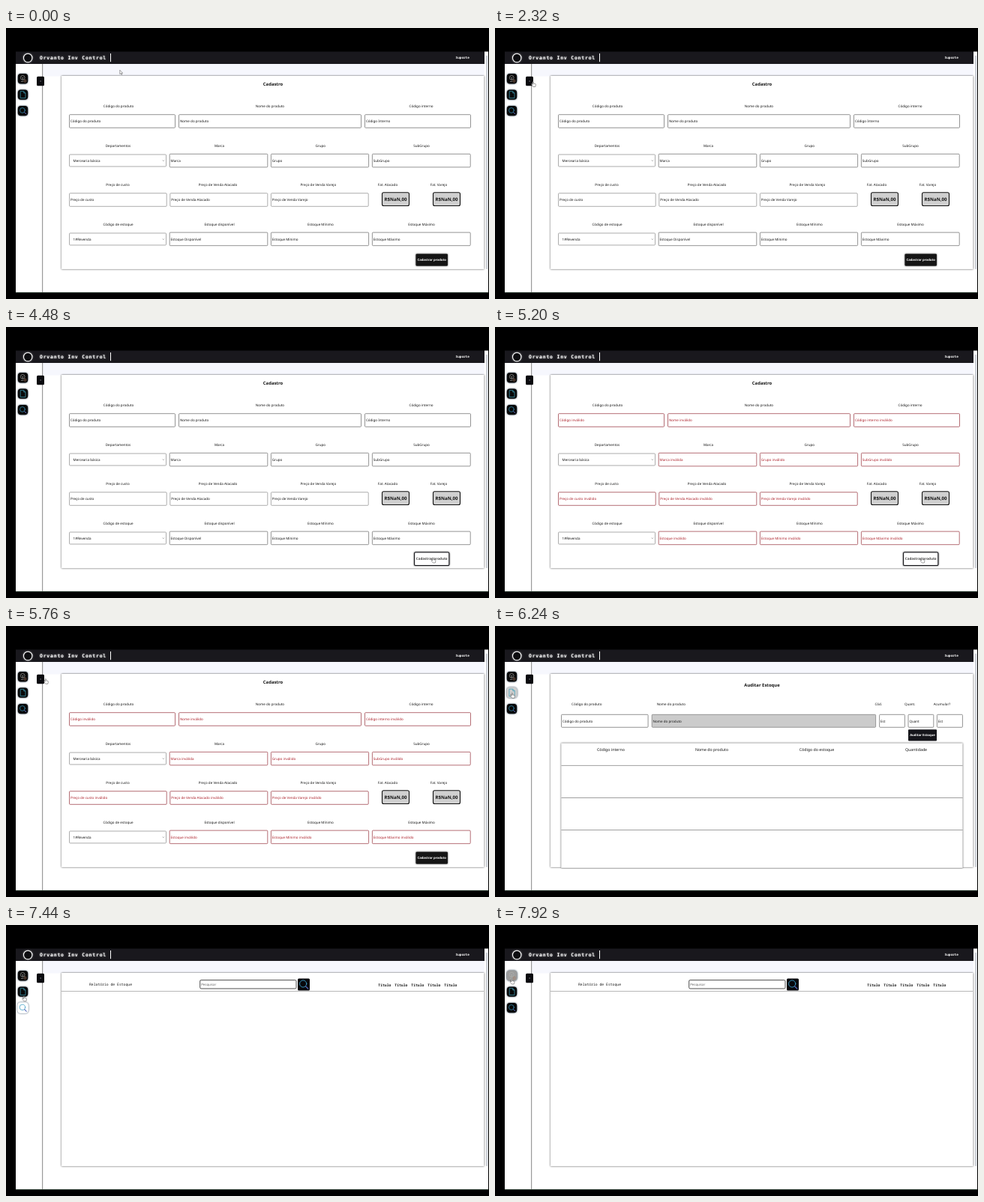
Recreate the animation shown at these times as an HTML page. Size 644 px wide and 362 px high, loop 8000 ms.

```html
<!DOCTYPE html>
<html lang="pt-BR">
<head>
<meta charset="utf-8">
<title>Cadastro</title>
<style>
  html, body { margin: 0; height: 100%; overflow: hidden; background: #000; }
  svg { display: block; width: 100vw; height: 100vh; }
  text { font: 4.55px "Noto Sans", sans-serif; fill: #141414; text-rendering: geometricPrecision; }
  .mid { text-anchor: middle; }
  .title { font-size: 5.9px; font-weight: 600; }
  .head { font-size: 5.25px; }
  .price { font-size: 6.1px; font-weight: 600; }
  .action { font-size: 4.2px; font-weight: 700; fill: #fff; }
  .mono { font: 4.75px "Noto Sans Mono", monospace; }
  .strong { font-weight: 600; }
  .brand { font: 700 6.4px "DejaVu Sans Mono", monospace; letter-spacing: .84px; fill: #fff; }
  .glow { filter: drop-shadow(0 0 1px #fff9); }
  .invalid { fill: #ac1f29; }
  .raised { filter: drop-shadow(0 0 1px #000b); }
</style>
</head>
<body>
<svg id="stage" viewBox="0 0 644 362" preserveAspectRatio="none"></svg>
<script>
const LOOP = 8000, STEP = 80, FADE = 400;
const RED = '#96303a', DARK = '#15151a';

const text = (x, y, label, cls = '') => `<text x="${x}" y="${y}" class="${cls}">${label}</text>`;
const mid = (x, y, label, cls = '') => text(x, y, label, 'mid ' + cls);
const rect = (x, y, w, h, fill, extra = '') =>
  `<rect x="${x}" y="${y}" width="${w}" height="${h}" fill="${fill}" ${extra}/>`;
const line = (x1, y1, x2, y2, color, width = .7) =>
  `<path d="M${x1} ${y1}L${x2} ${y2}" stroke="${color}" stroke-width="${width}"/>`;

const field = (x, y, w, label, { h = 17.6, stroke = '#666', fill = '#fff', cls = '' } = {}) =>
  rect(x, y, w, h, fill, `rx="1" stroke="${stroke}" stroke-width=".7"`) +
  text(x + 1.4, y + h / 2 + 1.7, label, cls);

const select = (y, label) =>
  rect(84.5, y, 129, 16, '#fff', 'rx="1" stroke="#999" stroke-width=".8"') +
  text(89.6, y + 9.7, label) +
  `<path d="M208.9 ${y + 7.6}l1 1 1-1" fill="none" stroke="#333" stroke-width=".5"/>`;

const price = (x, label) =>
  mid(x - 10.5, 211.2, label) +
  rect(x - 18, 219.7, 36, 17.8, '#d0d0d0', 'rx="2" stroke="#111" stroke-width="1.1"') +
  mid(x, 230.9, 'R$NaN,00', 'price');

// label, label centre, field x, y, width, placeholder, message when invalid
const FORM_FIELDS = [
  ['Código do produto', 150, 84.5, 115.7, 141, 'Código do produto', 'Código inválido'],
  ['Nome do produto', 352, 230.5, 115.7, 243, 'Nome do produto', 'Nome inválido'],
  ['Código interno', 553.5, 478.5, 115.7, 141, 'Código Interno', 'Código interno inválido'],
  ['Marca', 284.5, 218.2, 168.3, 130.6, 'Marca', 'Marca inválida'],
  ['Grupo', 419.3, 353.4, 168.3, 130.2, 'Grupo', 'Grupo inválido'],
  ['SubGrupo', 554, 488.4, 168.3, 130.8, 'SubGrupo', 'SubGrupo inválido'],
  ['Preço de custo', 149, 84.5, 220.7, 129.7, 'Preço de custo', 'Preço de custo inválido'],
  ['Preço de Venda Atacado', 282.5, 218.8, 220.7, 130, 'Preço de Venda Atacado', 'Preço de Venda Atacado inválido'],
  ['Preço de Venda Varejo', 416.3, 353.4, 220.7, 129.8, 'Preço de Venda Varejo', 'Preço de Venda Varejo inválido'],
  ['Estoque disponível', 284.5, 218.2, 273.1, 130.6, 'Estoque Disponível', 'Estoque inválido'],
  ['Estoque Mínimo', 419.3, 353.4, 273.1, 130.2, 'Estoque Mínimo', 'Estoque Mínimo inválido'],
  ['Estoque Máximo', 554, 488.4, 273.1, 130.8, 'Estoque Máximo', 'Estoque Máximo inválido'],
];

const form = invalid =>
  mid(356, 77.2, 'Cadastro', 'title') +
  FORM_FIELDS.map(([label, cx, x, y, w, hint, error]) =>
    mid(cx, y - 9.6, label) +
    (invalid ? field(x, y, w, error, { stroke: RED, cls: 'invalid' })
             : field(x, y, w, hint, { stroke: y === 220.7 ? '#8c8c8c' : '#666' }))).join('') +
  mid(149.5, 158.7, 'Departamentos') + select(169, 'Mercearia básica') +
  mid(149.5, 263.5, 'Código de estoque') + select(274, '1#Revenda') +
  price(519.5, 'Fat. Atacado') + price(587.5, 'Fat. Varejo');

const magnifier = (x, y, s = 1) =>
  `<g transform="translate(${x} ${y}) scale(${s})" fill="none" stroke-linecap="round">
    <circle cx="-.6" cy="-.6" r="3.4" stroke="#3a9cc4" stroke-width=".7"/>
    <path d="M1.9 1.9L4.3 4.3" stroke="#5a6cc0" stroke-width="1"/></g>`;

const audit =
  mid(356, 81.2, 'Auditar Estoque', 'title') +
  [[122.3, 'Código do produto'], [234.8, 'Nome do produto'], [511.3, 'Cód.'],
   [553.2, 'Quant.'], [596, 'Acumular?']].map(([x, label]) => mid(x, 106.1, label)).join('') +
  field(88.5, 118.3, 115.6, 'Código do produto', { h: 17 }) +
  field(209.2, 118.3, 298.4, 'Nome do produto', { h: 17, fill: '#cbcbcb', stroke: '#777' }) +
  field(512.6, 118.3, 33.8, 'Est', { h: 17 }) +
  field(551, 118.3, 33.8, 'Quant', { h: 17 }) +
  field(589.4, 118.3, 34, 'Est', { h: 17 }) +
  rect(551, 138.2, 38, 15.4, DARK, 'rx="1"') + mid(570, 147.4, 'Auditar Estoque', 'action') +
  rect(88.3, 156.5, 535.2, 166.5, '#fff', 'class="raised"') +
  [[154.4, 'Código interno'], [289, 'Nome do produto'], [429, 'Código do estoque'],
   [561.5, 'Quantidade']].map(([x, label]) => mid(x, 167.4, label, 'head')).join('') +
  [186.4, 229.5, 272.5].map(y => line(88.5, y, 623.5, y, '#777')).join('');

const report =
  line(74, 88.5, 637, 88.5, '#999') +
  text(111, 80.8, 'Relatório de Estoque', 'mono') +
  rect(258.7, 73.6, 128.3, 11.4, '#fff', 'rx="1.5" stroke="#222" stroke-width=".8"') +
  `<text x="260.2" y="80.9" style="font-size:4.4px;fill:#666">Pesquisar</text>` +
  rect(389, 71.5, 16, 16, '#08080c', 'rx="1.5"') + magnifier(397, 79.3, 1.35) +
  [0, 1, 2, 3, 4].map(i => text(496.3 + 22 * i, 81.6, 'Título', 'mono strong')).join('');

const GLYPHS = [
  `<g fill="none" stroke="#b4b4b0" stroke-width=".6"><circle cx="-.3" cy="-1.3" r="2.9"/>
   <path d="M-1.6-2l1.3 1.4L1-2M-.3-.6V2M-2.5 3.8H.8"/><path d="M1.8 1.6h2.4v2.8H1.8z" stroke="#a87a62"/></g>`,
  `<path d="M-3.3-4.5H1.2L3.5-2.2V4.5H-3.3zM1.2-4.5v2.3h2.3" fill="none" stroke="#3fa3bb" stroke-width=".7"/>`,
  magnifier(0, 0),
];
const ICON_Y = [67.7, 89.1, 110.6];
const icons = GLYPHS.map((glyph, i) =>
  `<g id="icon${i}"><rect x="-6.7" y="-6.7" width="13.4" height="13.4" rx="4"
    style="filter:drop-shadow(0 0 1px #40566a)"/>${glyph}</g>`).join('');

const shell =
  rect(13, 48, 630, 305, '#fff') +
  rect(638, 31.5, 5, 17, '#fff') +
  rect(49, 48, 589, 16.5, '#f6f7fd') +
  line(13, 353.3, 643, 353.3, '#5c7a64', .6) +
  rect(640.2, 37, 2, 285, '#c5cad2') +
  rect(13, 31.5, 625, 16.5, '#19181d') +
  `<circle cx="29.2" cy="40" r="5.7" fill="#0c0c10" stroke="#fff" stroke-width="1.1" class="glow"/>` +
  text(45, 42, 'Orvanto Inv Control', 'brand glow') +
  line(139.5, 34, 139.5, 45.2, '#fff', 1) +
  `<text x="599.6" y="41.3" class="mono" style="font-size:4.35px;font-weight:600;fill:#fff">Suporte</text>` +
  line(48.6, 48, 48.6, 353, '#9a9a9a', 1.2) +
  rect(74, 64, 563.4, 258.2, '#fff', 'class="raised"') +
  rect(41, 64.7, 10, 12.6, '#0b0b0f', 'rx="1.5"') +
  `<path d="M45.6 70l1 1-1 1" fill="none" stroke="#ccc" stroke-width=".5"/>`;

const submit = `<g id="submit"><rect x="-21.2" y="-8" width="42.4" height="16" rx="1.2"
  class="raised"/><text y="1.5" class="mid action">Cadastrar produto</text></g>`;

const cursors =
  `<g id="cursor" stroke="#444" stroke-width=".5" fill="#fff" stroke-linejoin="round">
    <path id="arrow" d="M0 0V5.4L1.3 4.3 2.2 6.2 3 5.8 2.2 4H3.8Z"/>
    <path id="hand" d="M-.6 .5Q0-.3 .6 .5V2.6L3.2 3.2Q3.8 3.4 3.6 4.4L3 7H0L-1.9 4.6Q-2-.1 -.6 4Z"/></g>`;

const pages = [form(false), form(true), audit, report];
const stage = document.getElementById('stage');
stage.innerHTML = shell + pages.map((page, i) => `<g id="page${i}">${page}</g>`).join('') +
  submit + icons + cursors;
const get = id => document.getElementById(id);

const show = (id, visible) => get(id).setAttribute('display', visible ? 'inline' : 'none');
const clamp = v => Math.max(0, Math.min(1, v));
const hover = (t, enter, leave) => clamp((t - enter) / FADE) - clamp((t - leave) / FADE);
const gray = (a, b, k) => { const v = Math.round(a + (b - a) * k); return `rgb(${v},${v},${v})`; };

// time, x, y of the pointer tip
const PATH = [
  [0, 151.8, 56.2], [1280, 151.8, 56.2], [1760, 50.8, 71.5], [2320, 50.8, 71.5],
  [2480, 212, 179], [2720, 212, 179], [2880, 474, 262], [3120, 474, 262],
  [3360, 532, 273], [3760, 532, 273], [3920, 563, 298], [4000, 563, 298],
  [4240, 569.3, 308], [5200, 569.3, 308], [5600, 52.8, 70.3], [5760, 52.8, 70.3],
  [6000, 22.8, 89.3], [6560, 22.8, 89.3], [6800, 25, 110], [7280, 25, 110],
  [7680, 22.3, 72], [LOOP, 22.3, 72],
];
const HAND_TIMES = [[1760, 2400], [4080, 5280], [5600, LOOP]];
const ICON_HOVERS = [[7680, LOOP], [5920, 6640], [6640, 7440]];

function pointer(t) {
  const i = PATH.findIndex(([end]) => end > t);
  const [t0, x0, y0] = PATH[i - 1], [t1, x1, y1] = PATH[i];
  const k = (t - t0) / (t1 - t0);
  return [x0 + (x1 - x0) * k, y0 + (y1 - y0) * k];
}

function draw(now) {
  const t = Math.floor((now % LOOP) / STEP) * STEP;
  const current = t < 5120 ? 0 : t < 6160 ? 1 : t < 7120 ? 2 : 3;
  pages.forEach((_, i) => show('page' + i, i === current));

  const lit = hover(t, 4000, 5280);
  const button = get('submit');
  show('submit', current < 2);
  button.setAttribute('transform', `translate(567.7 309.8) scale(${1 + .09 * lit})`);
  button.firstChild.setAttribute('style',
    `fill:${gray(21, 255, lit)};stroke:#15151a;stroke-width:${lit}`);
  button.lastChild.style.fill = gray(255, 70, lit);

  ICON_HOVERS.forEach(([enter, leave], i) => {
    const k = hover(t, enter, leave), icon = get('icon' + i);
    icon.setAttribute('transform', `translate(22.5 ${ICON_Y[i]}) scale(${1 + .1 * k})`);
    icon.firstChild.setAttribute('fill', gray(8, 255, k));
  });

  const isHand = HAND_TIMES.some(([from, to]) => t >= from && t < to);
  show('hand', isHand);
  show('arrow', !isHand);
  get('cursor').setAttribute('transform', `translate(${pointer(t)})`);
}

const start = performance.now();
function tick() {
  draw(performance.now() - start);
  requestAnimationFrame(tick);
}
tick();
</script>
</body>
</html>
```
